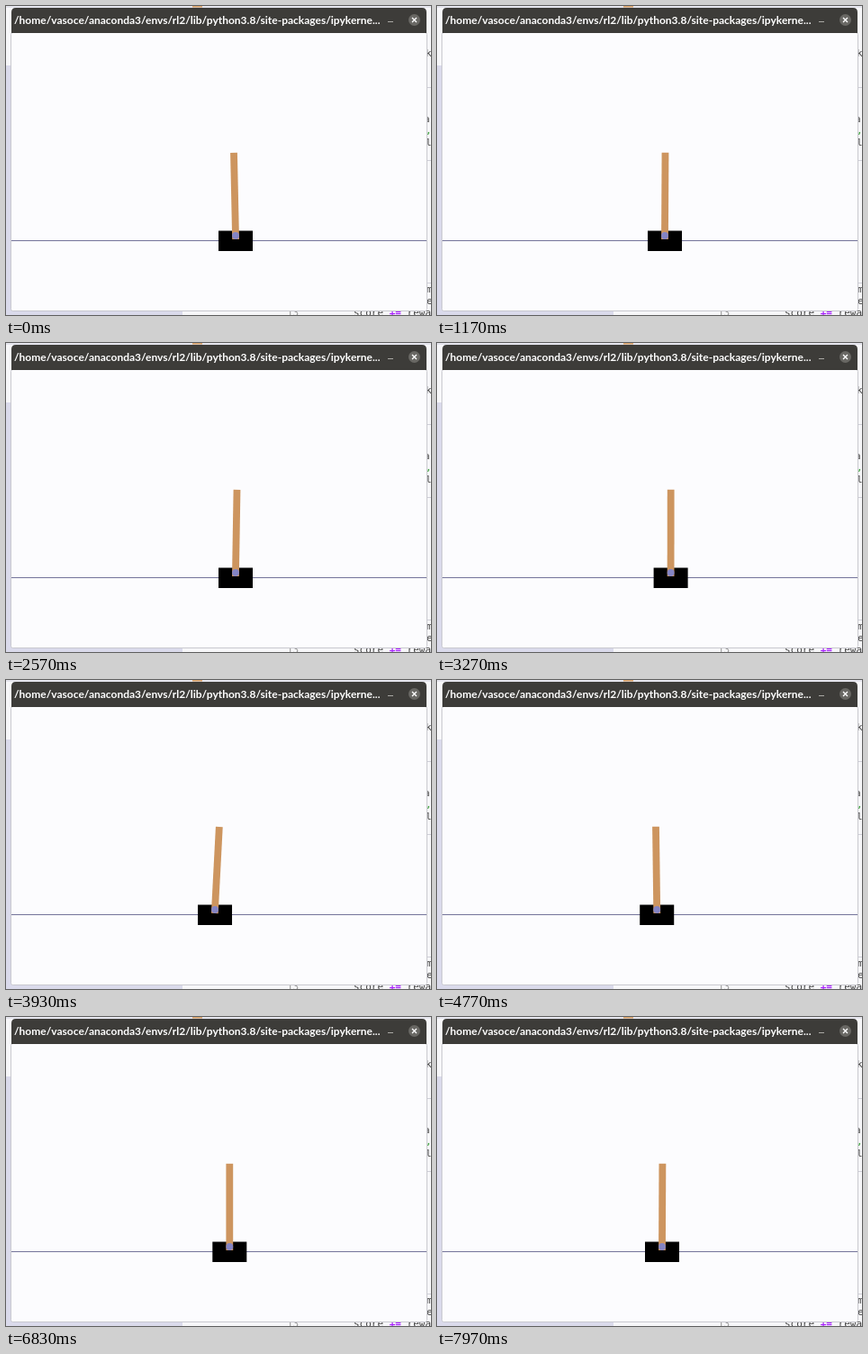
Write an HTML page that moves like this. It is 472 px wide and 343 px high and loops after 8000 ms.

```html
<!DOCTYPE html>
<html lang="en">
<head>
<meta charset="utf-8">
<title>Cart pole</title>
<style>
  html, body { margin: 0; width: 100%; height: 100%; overflow: hidden; background: #f7f7f8; }
  svg { display: block; width: 472px; height: 343px; }
  .code { font: 11px "DejaVu Sans Mono", monospace; fill: #444; white-space: pre; }
  .title { font: 700 12px Lato, sans-serif; fill: #fff; }
</style>
</head>
<body>
<svg viewBox="0 0 472 343">
  <!-- notebook behind the window -->
  <rect width="472" height="343" fill="#f7f7f9"/>
  <rect y="66" width="196" height="277" fill="#dadaeb"/>
  <rect width="472" height="2" fill="#e6e6ee"/>
  <rect x="207" width="11" height="1.5" fill="#d9a066"/>
  <path d="M466 90.5h6M466 171.5h6M466 307.5h6" stroke="#cfcfd8"/>
  <g class="code">
    <text x="466" y="56">k</text>
    <text x="464" y="129">a</text>
    <text x="466" y="142" fill="#393">,</text>
    <text x="466" y="155">l</text>
    <text x="467" y="318">m</text>
    <text x="467" y="331">e</text>
    <text x="312" y="344" fill="#999">13</text>
    <text x="386" y="344">score <tspan fill="#a2f" font-weight="700">+=</tspan> reward</text>
  </g>

  <!-- window -->
  <rect x="5.5" y="29.5" width="462" height="309" rx="2" fill="#fcfcfe" stroke="#c9c9cf"/>
  <path d="M6 30V7q0-5 5-5H462q5 0 5 5V30z" fill="#3d3c39"/>
  <text class="title" x="9" y="20">/home/vasoce/anaconda3/envs/rl2/lib/python3.8/site-packages/ipykerne...</text>
  <path d="M424 17.5h6" stroke="#aaa9a5"/>
  <circle cx="453.5" cy="15.5" r="6.5" fill="#696864"/>
  <path d="M451 13l5 5m0-5l-5 5" stroke="#fff" stroke-width="1.3"/>

  <!-- cart pole -->
  <path d="M6 260.5H467" stroke="#74749a"/>
  <g id="cart">
    <rect x="-19" y="249.5" width="38" height="22.5"/>
    <g id="pole">
      <rect x="-3.9" y="162.8" width="7.8" height="96.2" fill="#cd955f"/>
      <circle cy="255" r="3.9" fill="#8484c4"/>
    </g>
  </g>
</svg>
<script>
  const LOOP = 8000, RESET = 3915, POLE_LENGTH = 92;

  // Each key: time in ms, cart centre, sideways offset of the pole tip
  const balanced = [
    [0, 255, -2], [600, 254, -0.5], [1170, 253, 0.5], [1700, 253.5, 0.8],
    [2570, 255, 1.5], [3000, 257.5, 1], [3330, 259.8, 0], [RESET, 259, -0.5]
  ];
  const restarted = [
    [RESET, 232, 4.8], [4200, 235, 3], [4650, 244.5, -1.5], [5000, 243.5, -0.5],
    [5670, 247.5, -0.5], [6200, 249, -0.4], [6830, 248.3, 0], [7400, 250, 0], [LOOP, 250, 0.4]
  ];

  const cart = document.getElementById('cart');
  const pole = document.getElementById('pole');

  function poseAt(time) {
    const keys = time < RESET ? balanced : restarted;
    const next = keys.findIndex(key => key[0] > time);
    const from = keys[next - 1], to = keys[next];
    const u = (time - from[0]) / (to[0] - from[0]);
    const ease = u * u * (3 - 2 * u);
    return [1, 2].map(i => from[i] + (to[i] - from[i]) * ease);
  }

  function draw() {
    const [x, lean] = poseAt(performance.now() % LOOP);
    const angle = Math.asin(lean / POLE_LENGTH) * 180 / Math.PI;
    cart.setAttribute('transform', `translate(${x} 0)`);
    pole.setAttribute('transform', `rotate(${angle} 0 255)`);
    requestAnimationFrame(draw);
  }
  draw();
</script>
</body>
</html>
```
